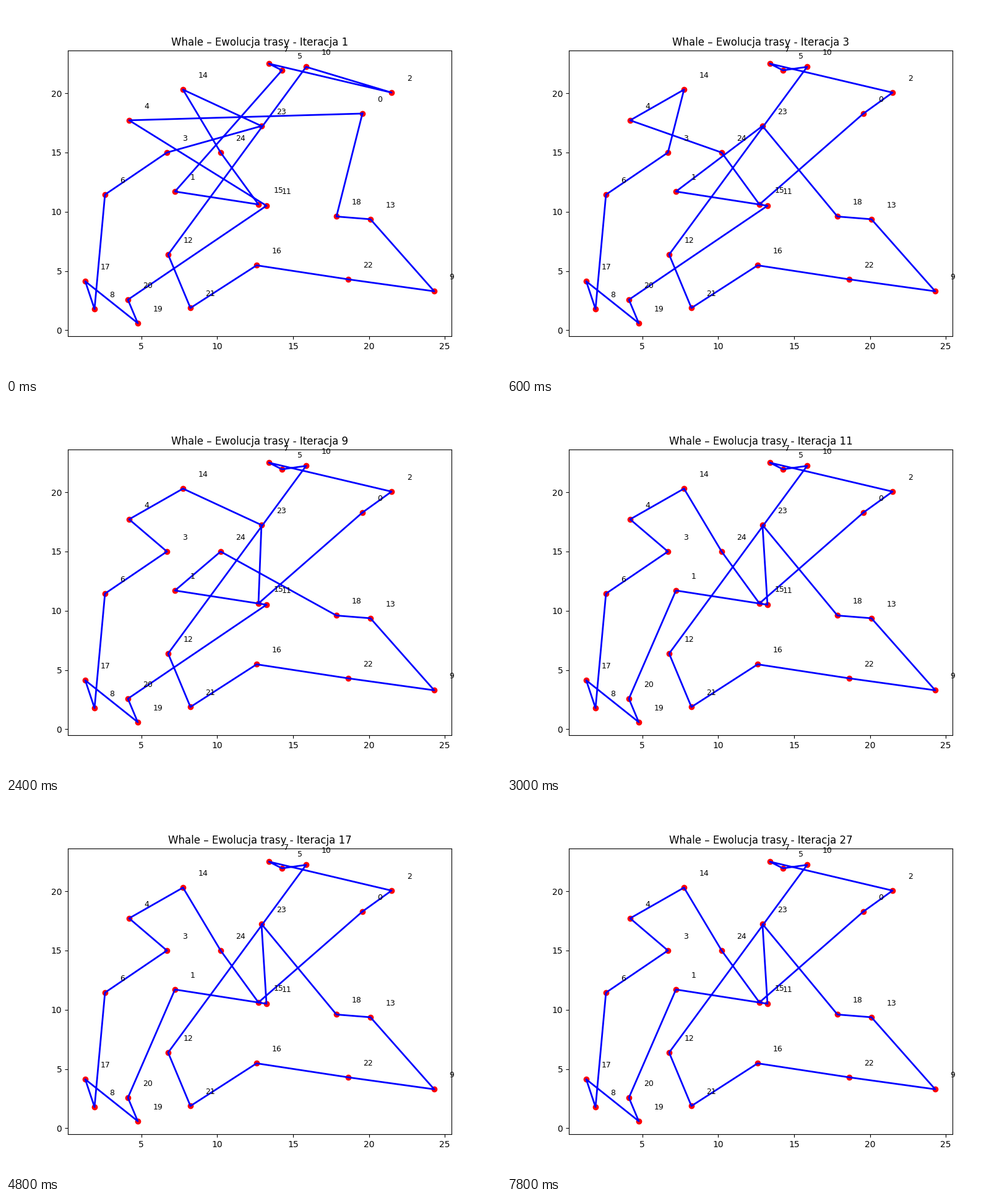
These frames come from a looping animation (800 by 600 pixels, 8 s). A matplotlib script:

```python
import numpy as np
import matplotlib.pyplot as plt
from matplotlib.animation import FuncAnimation

INTERVAL = 100
FRAMES = 80
FRAMES_PER_ITERATION = 3

CITIES = np.array([
    (19.57, 18.29), (7.22, 11.71), (21.49, 20.06), (6.69, 15.00), (4.20, 17.72),
    (14.27, 21.94), (2.61, 11.45), (13.41, 22.50), (1.92, 1.79), (24.30, 3.29),
    (15.86, 22.23), (13.25, 10.51), (6.77, 6.39), (20.10, 9.37), (7.75, 20.31),
    (12.72, 10.62), (12.60, 5.48), (1.31, 4.13), (17.86, 9.60), (4.77, 0.60),
    (4.12, 2.58), (8.24, 1.88), (18.63, 4.30), (12.92, 17.24), (10.23, 15.00),
])

# Stretches shared by several routes
SOUTH = [18, 13, 9, 22, 16, 21, 12, 10]
NORTH_EAST = [0, 2, 7, 5] + SOUTH[::-1]
WEST = [6, 8, 17, 19, 20]

# Best route, keyed by the iteration that found it
ROUTES = {
    1: [0] + SOUTH + [2, 7, 5, 1, 15, 24, 14, 23, 3] + WEST + [11, 4],
    3: NORTH_EAST + [23, 1, 11] + WEST[::-1] + [3, 14, 4, 24, 15],
    6: NORTH_EAST + [24, 1, 11] + WEST[::-1] + [3, 4, 14, 23, 15],
    11: NORTH_EAST + [23, 11, 1] + WEST[::-1] + [3, 4, 14, 24, 15],
}


def best_route(iteration):
    return ROUTES[max(found for found in ROUTES if found <= iteration)]


fig, ax = plt.subplots(figsize=(8, 6), dpi=100)
ax.scatter(*CITIES.T, c="red")
for index, (x, y) in enumerate(CITIES):
    ax.text(x + 1, y + 1, str(index), fontsize=9)
line, = ax.plot([], [], "b-", linewidth=2)
ax.set_xlim(0.165, 25.44)
ax.set_ylim(-0.5, 23.61)
title = ax.set_title("")


def update(frame):
    iteration = 1 + frame // FRAMES_PER_ITERATION
    route = best_route(iteration)
    line.set_data(*CITIES[route + route[:1]].T)
    title.set_text(f"Whale – Ewolucja trasy - Iteracja {iteration}")
    return line, title


anim = FuncAnimation(fig, update, frames=FRAMES, interval=INTERVAL, repeat=True)
plt.show()
```
